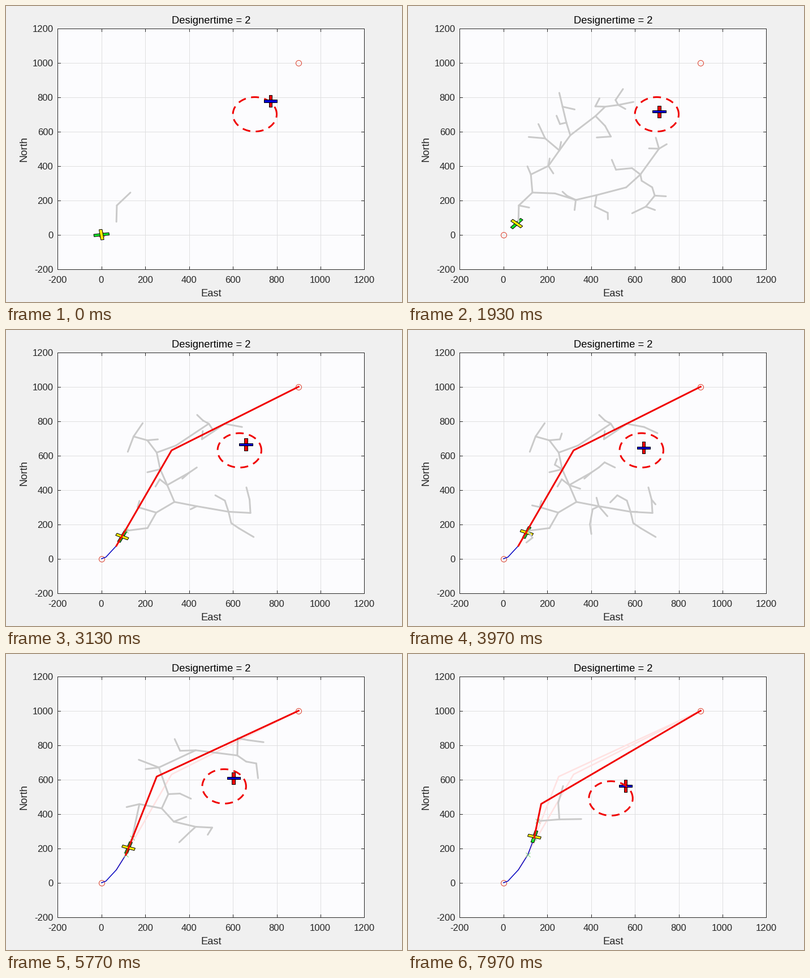
Animation, 700 px wide and 525 px high, one loop 8000 ms. Source, as a matplotlib script:

```python
import math
import random

import matplotlib.pyplot as plt
import numpy as np
from matplotlib.animation import FuncAnimation
from matplotlib.collections import LineCollection
from matplotlib.patches import Polygon, Rectangle

W, H, DPI = 700, 525, 100
FRAMES, LOOP = 240, 8000
PX = 72 / DPI
LEFT, RIGHT, TOP, BOTTOM = 91.4, 633.4, 39.6, 466.6
RED, INK = "#f00000", "#262626"
RATE = 32  # tree nodes per simulated second

plt.rcParams["font.family"] = "Liberation Sans"
plt.rcParams["axes.unicode_minus"] = False


def px(east, north):
    """Map coordinates to stage pixels."""
    x = LEFT + (np.asarray(east) + 200) * (RIGHT - LEFT) / 1400
    y = BOTTOM - (np.asarray(north) + 200) * (BOTTOM - TOP) / 1400
    return x, y


def clock(ms):
    """Simulated seconds; the simulation slows down after the first plan."""
    return np.interp(ms, [0, 1930, 3130, LOOP], [0, 1.77, 3.27, 6.16])


# Position of the aircraft at each replanning, every two seconds
GOAL = (900, 1000)
STOPS = [(0, 0), (68, 75), (111, 162), (140, 261), (155, 358)]
BENDS = [(320, 630), (252, 617), (172, 458)]
ROUTE_T = np.array([0, 0.4, 2, 4, 6, 8])
ROUTE = np.array([STOPS[0], (20, 9)] + STOPS[1:])

# Main nodes of each search tree; twigs are sampled around them
LIMBS = [
    [(70, 170), (132, 245), (125, 350), (235, 240), (205, 400), (330, 202),
     (255, 490), (305, 578), (425, 230), (560, 275), (625, 350), (190, 560),
     (420, 690), (710, 500)],
    [(210, 178), (250, 268), (333, 330), (165, 300), (300, 428), (268, 520),
     (252, 617), (340, 658), (490, 785), (435, 305), (580, 273), (680, 266),
     (400, 500)],
    [(173, 457), (275, 432), (305, 515), (262, 670), (170, 715), (430, 770),
     (330, 355), (620, 740), (622, 840), (430, 325)],
    [(255, 368), (355, 370), (250, 465), (272, 562)],
]


def zone_centre(stage):
    return 700 - 70 * stage


def grow(stage):
    """Rapidly exploring tree: each node joins the nearest older one."""
    rng = random.Random(stage)
    nodes, edges = [STOPS[stage + 1]], []
    limbs = list(LIMBS[stage])
    c = zone_centre(stage)
    while len(edges) < 2 * RATE:
        if limbs:
            new = limbs.pop(0)
            near = min(nodes, key=lambda p: math.dist(p, new))
        else:
            aim = rng.uniform(90, 780), rng.uniform(80, 850)
            near = min(nodes, key=lambda p: math.dist(p, aim))
            reach = math.dist(near, aim)
            step = min(1, rng.uniform(45, 95) / reach)
            new = tuple(a + (b - a) * step for a, b in zip(near, aim))
            if reach < 30 or math.dist(new, (c, c)) < 110:
                continue
        nodes.append(new)
        edges.append(np.column_stack(px(*zip(near, new))))
    return edges


TREES = [grow(stage) for stage in range(4)]

fig = plt.figure(figsize=(W / DPI, H / DPI), dpi=DPI, facecolor="#f0f0f0")
ax = fig.add_axes([0, 0, 1, 1])
ax.set_xlim(0, W)
ax.set_ylim(H, 0)
ax.axis("off")


def line(xs, ys, color, width, z, **kw):
    return ax.plot(xs, ys, color=color, lw=width * PX, zorder=z, **kw)[0]


def route_line(points, color, width, z):
    return line(*px(*zip(*points)), color, width, z)


def text(x, y, s, size, ha="center", color=INK, **kw):
    ax.text(x, y, s, size=size * PX, ha=ha, va="baseline", color=color, **kw)


def draw_chart():
    size = RIGHT - LEFT, BOTTOM - TOP
    ax.add_patch(Rectangle((LEFT, TOP), *size, fc="#fcfcfe", ec="none",
                           zorder=0))
    ax.add_patch(Rectangle((LEFT, TOP), *size, fc="none", ec=INK, lw=PX,
                           zorder=20))
    for v in range(-200, 1201, 200):
        x, y = px(v, v)
        if -200 < v < 1200:
            line([x, x], [TOP, BOTTOM], "#dfdfe0", 1, 1)
            line([LEFT, RIGHT], [y, y], "#dfdfe0", 1, 1)
        for edge, d in ((TOP, 5), (BOTTOM, -5)):
            line([x, x], [edge, edge + d], INK, 1, 20)
        for edge, d in ((LEFT, 5), (RIGHT, -5)):
            line([edge, edge + d], [y, y], INK, 1, 20)
        text(x - 0.5, 491, str(v), 16.67)
        text(83.5, y + 6.4, str(v), 16.67, ha="right")
    mid = (LEFT + RIGHT) / 2
    text(mid + 0.5, 31, "Designertime = 2", 18.33, color="black")
    text(mid + 0.5, 515, "East", 18.33)
    text(36.5, (TOP + BOTTOM) / 2, "North", 18.33, rotation=90,
         rotation_mode="anchor")
    for spot in (STOPS[0], GOAL):
        ax.plot(*px(*spot), "o", ms=10 * PX, mfc="none", mec="#dc3c28",
                mew=PX, zorder=3)


def bar(color, z):
    patch = Polygon([(0, 0)] * 4, fc=color, ec="black", lw=PX, zorder=z)
    return ax.add_patch(patch)


def place(patch, e, n, length, angle):
    a = np.radians(angle)
    u = np.array([-1, 1, 1, -1]) * length / 2
    v = np.array([-1, -1, 1, 1]) * 7
    patch.set_xy(np.column_stack(px(e + u * np.cos(a) - v * np.sin(a),
                                    n + u * np.sin(a) + v * np.cos(a))))


def place_craft(craft, e, n, angle):
    place(craft[0], e, n, 70, angle)
    place(craft[1], e, n, 60, angle + 90)


draw_chart()
craft = bar("#14e628", 5), bar("#fff000", 6)
intruder = bar("#f00000", 5), bar("#0000d0", 6)
tree = LineCollection([], colors="#cacaca", linewidths=3 * PX, zorder=7,
                      capstyle="round")
ax.add_collection(tree)
paths = [(STOPS[k + 1], bend, GOAL) for k, bend in enumerate(BENDS)]
old_plans = [route_line(p, "#ffe2e2", 2.6, 4) for p in paths]
plans = [route_line(p, RED, 3, 9) for p in paths]
roots = [ax.plot(*px(*s), "x", ms=8 * PX, mew=PX, color="#78d278",
                 zorder=8)[0] for s in STOPS[2:]]
trail = line([], [], "#0000c0", 1.5, 4.5)
zone = line([], [], RED, 3, 9, linestyle=(0, (14 / 3, 9.6 / 3)))
PHI = np.linspace(0, 2 * np.pi, 181)


def update(i):
    t = clock(i * LOOP / FRAMES)
    stage = int(t // 2)

    e, n = (np.interp(t, ROUTE_T, axis) for axis in ROUTE.T)
    place_craft(craft, e, n, 78 - 70 * math.exp(-t / 2))
    east = 772 - 35 * t
    place_craft(intruder, east, east + 5, 90)

    c = zone_centre(stage)
    zone.set_data(*px(c + 100 * np.cos(PHI), c + 100 * np.sin(PHI)))
    zone.set_zorder(9 if stage else 4)

    # The first tree already has two branches when the loop begins
    age = t - 2 * stage
    tree.set_segments(TREES[stage][:int(age * RATE) + 2 * (stage == 0)])
    for k in range(3):
        plans[k].set_visible(k == stage - 1)
        old_plans[k].set_visible(k < stage - 1)
        roots[k].set_visible(k < stage)

    # The trail reaches as far as the latest replanning
    flown = ROUTE[ROUTE_T <= 2 * stage] if stage else ROUTE[:1]
    trail.set_data(*px(*flown.T))
    return (*craft, *intruder, tree, *plans, *old_plans, *roots, trail, zone)


anim = FuncAnimation(fig, update, frames=FRAMES, interval=LOOP / FRAMES,
                     init_func=lambda: update(0), repeat=True,
                     repeat_delay=0, blit=False)
plt.show()
```
